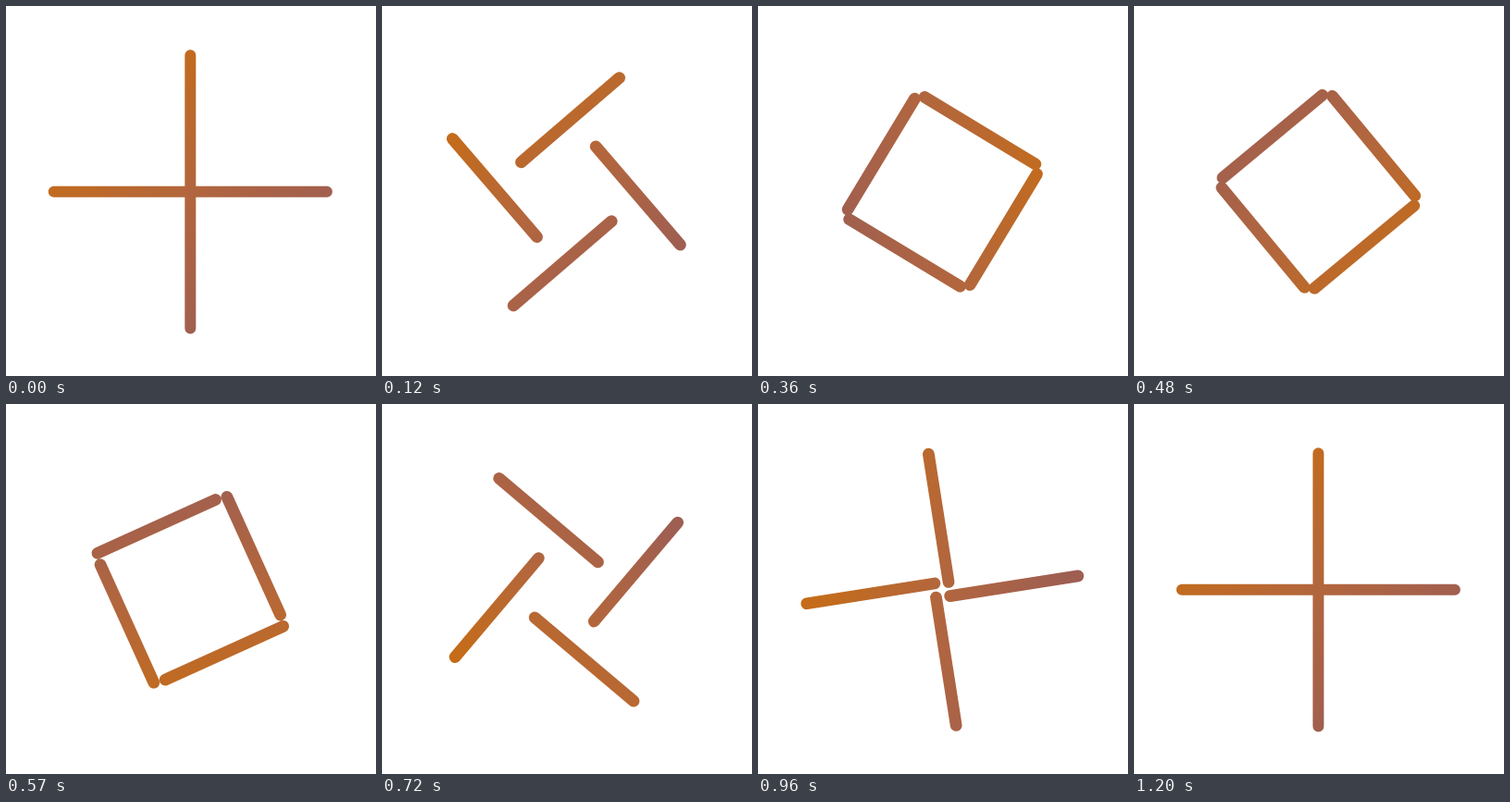
These frames come from a looping animation (400 px wide and 400 px high, 3260 ms). An HTML page with a canvas:

```html
<!DOCTYPE html>
<html lang="en">
<head>
<meta charset="utf-8">
<title>Spinning cross</title>
<style>
  html, body { margin: 0; width: 100%; height: 100%; overflow: hidden; background: #fff; }
  canvas { display: block; width: 100vw; height: 100vh; }
</style>
</head>
<body>
<canvas id="stage" width="400" height="400"></canvas>
<script>
const ctx = document.getElementById('stage').getContext('2d');
const LOOP = 3260, STEP = 30, END = 1200;
const CENTER_X = 199.3, CENTER_Y = 200.8;
const ORBIT = 77.6, HALF = 70;
const QUARTER = Math.PI / 2;

const gradient = ctx.createLinearGradient(-90, -90, 90, 90);
gradient.addColorStop(0, '#c46c1a');
gradient.addColorStop(.5, '#b2663e');
gradient.addColorStop(1, '#9e5e52');

// Same meaning as the CSS cubic-bezier() function
function bezier(x1, y1, x2, y2) {
  const at = (a, b, s) => 3 * (1 - s) * s * ((1 - s) * a + s * b) + s ** 3;
  return x => {
    let lo = 0, hi = 1;
    for (let i = 0; i < 24; i++) {
      const mid = (lo + hi) / 2;
      if (at(x1, x2, mid) < x) lo = mid; else hi = mid;
    }
    return at(y1, y2, lo);
  };
}

const easeSpin = bezier(.333, 0, .32, 1);
const easeFold = bezier(.25, .1, .25, 1);
const easeUnfold = bezier(.14, 0, .11, 1);
const easeShade = x => 1 - (1 - x) ** 1.65;

const progress = (t, from, to) => Math.min(1, Math.max(0, (t - from) / (to - from)));

// The group makes a quarter turn
const spinAt = t => QUARTER * easeSpin(progress(t, 0, END));

// Bars close to a square, wait, then open again
const foldAt = t => QUARTER * (easeFold(progress(t, 0, 400)) + easeUnfold(progress(t, 540, 1190)));

// The colours make a full turn on their own
const shadeAt = t => 4 * QUARTER * easeShade(progress(t, 110, END));

function line(x0, y0, x1, y1) {
  ctx.moveTo(x0, y0);
  ctx.lineTo(x1, y1);
}

function addCross() {
  const r = ORBIT + HALF;
  line(-r, 0, r, 0);
  line(0, -r, 0, r);
}

// Each bar turns about its own middle while the middles orbit
function addBars(spin, fold) {
  for (let i = 0; i < 4; i++) {
    const a = i * QUARTER + spin;
    const x = ORBIT * Math.cos(a), y = ORBIT * Math.sin(a);
    const dx = HALF * Math.cos(a + fold), dy = HALF * Math.sin(a + fold);
    line(x - dx, y - dy, x + dx, y + dy);
  }
}

function draw(now) {
  const t = Math.floor((now % LOOP) / STEP) * STEP;
  const moving = t > 0 && t < END;

  ctx.setTransform(1, 0, 0, 1, 0, 0);
  ctx.fillStyle = '#fff';
  ctx.fillRect(0, 0, 400, 400);

  ctx.translate(CENTER_X, CENTER_Y);
  ctx.beginPath();
  if (moving) addBars(spinAt(t), foldAt(t));
  else addCross();

  // The path is fixed by now, so this turns only the paint
  ctx.rotate(shadeAt(t));
  ctx.strokeStyle = gradient;
  ctx.lineWidth = moving ? 12.8 : 12;
  ctx.lineCap = 'round';
  ctx.stroke();
}

const start = performance.now();
function tick() {
  draw(performance.now() - start);
  requestAnimationFrame(tick);
}
tick();
</script>
</body>
</html>
```
